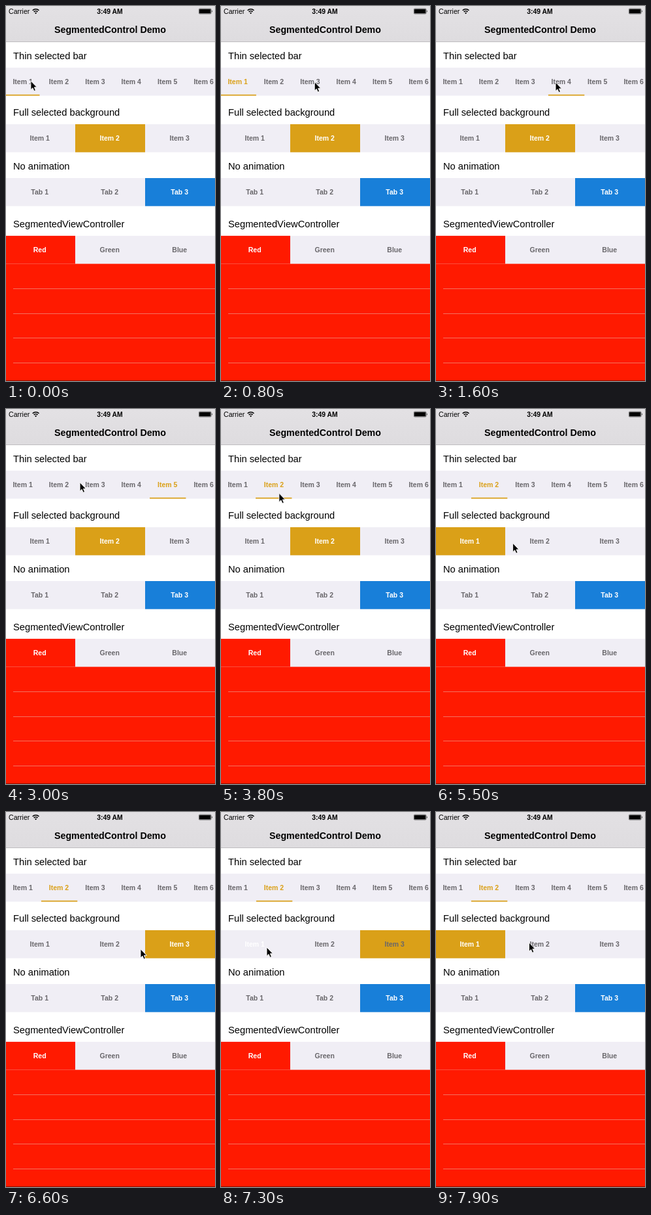
These frames come from a looping animation (320 px wide and 571 px high, 8000 ms). An HTML page:

```html
<!DOCTYPE html>
<html lang="en">
<head>
<meta charset="utf-8">
<title>SegmentedControl Demo</title>
<style>
html, body { margin: 0; width: 100%; height: 100%; overflow: hidden; background: #fff; }
svg { display: block; width: 320px; height: 571px; }
text { font-family: "Liberation Sans", Arial, sans-serif; }
.head { font-size: 14.7px; }
.seg { font-size: 10.5px; font-weight: bold; text-anchor: middle; fill: #69676b; }
</style>
</head>
<body>
<svg viewBox="0 0 320 571">
  <defs>
    <linearGradient id="nav" x2="0" y2="1">
      <stop stop-color="#e3e1e4"/><stop offset="1" stop-color="#dedcdf"/>
    </linearGradient>
  </defs>
  <rect width="320" height="571" fill="#fff"/>
  <rect width="320" height="54" fill="url(#nav)"/>
  <rect y="54" width="320" height="1" fill="#c0bec1"/>
  <text x="4" y="11.5" font-size="10.6">Carrier</text>
  <g fill="none" stroke="#000" stroke-width="1.6">
    <path d="M40.7 6.7a7 7 0 0 1 9.8 0M42.7 8.9a4.2 4.2 0 0 1 5.8 0"/>
    <path d="M45.6 12.2l-1.5-1.7a2.2 2.2 0 0 1 3 0z" fill="#000" stroke="none"/>
  </g>
  <text x="159" y="11.5" font-size="10.4" font-weight="bold" text-anchor="middle">3:49 AM</text>
  <rect x="295.3" y="4" width="18.8" height="8" rx="1.5" fill="none" stroke="#000" stroke-width=".5"/>
  <rect x="296" y="4.7" width="17.4" height="6.6" rx=".8"/>
  <path d="M315 6.3q1.6 1.7 0 3.4z"/>
  <text x="159.5" y="40.7" font-size="14.25" font-weight="bold" text-anchor="middle">SegmentedControl Demo</text>
  <g id="page"></g>
  <path id="cursor" d="M0 0V13.4L3 10.6 5.1 15.4 7.4 14.4 5.4 9.7H9.4Z" stroke="#fff" stroke-width=".9"/>
</svg>
<script>
const LOOP = 8000, ROW = 42.67, GOLD = '#daa018', RED = '#ff1a00';
const page = document.getElementById('page');
const cursor = document.getElementById('cursor');

function add(tag, attrs, text = '') {
  const el = document.createElementNS('http://www.w3.org/2000/svg', tag);
  for (const k in attrs) el.setAttribute(k, attrs[k]);
  el.textContent = text;
  page.append(el);
  return el;
}

const clamp = k => Math.min(1, Math.max(0, k));
const smooth = k => k * k * (3 - 2 * k);
const slide = ms => smooth(clamp(ms / 300));

// Damped spring, about 4.5% overshoot after 350 ms
function spring(ms) {
  const s = 9 * ms / 1000;
  return 1 - Math.exp(-s) * (Math.cos(s) + Math.sin(s));
}

// A heading, its strip, the selection marker and the labels
function control(title, y, names, color, selected, thin = false) {
  const pitch = thin ? 55.4 : 107, left = thin ? -1.5 : -1;
  const height = thin ? 1.7 : ROW;
  add('text', { class: 'head', x: 11, y: y - 12.9 }, title);
  add('rect', { y, width: 320, height: ROW, fill: '#f0eef5' });
  const marker = add('rect', { y: y + ROW - height, height, width: pitch, fill: color });
  const labels = names.map((name, i) =>
    add('text', { class: 'seg', x: left + pitch * (i + .5) - (thin ? .6 : .8), y: y + 25.3 }, name));

  function show(pos, active) {
    marker.setAttribute('x', left + pitch * pos);
    labels.forEach((label, i) =>
      label.style.fill = i === active ? (thin ? color : '#fff') : '');
  }
  // The thin bar springs and colours its label once settled
  function update(t, taps) {
    let from = selected, to = selected, start = -LOOP;
    for (const tap of taps)
      if (tap.time <= t) [from, to, start] = [to, tap.segment, tap.time];
    const age = t - start, move = thin ? spring : slide;
    show(from + (to - from) * move(age), thin && age < 400 ? -1 : to);
  }
  show(selected, selected);
  return { update };
}

const numbered = (word, n) => Array.from({ length: n }, (_, i) => `${word} ${i + 1}`);
add('rect', { y: 392, width: 320, height: 179, fill: RED });
const thin = control('Thin selected bar', 93.87, numbered('Item', 6), GOLD, 1, true);
const full = control('Full selected background', 180, numbered('Item', 3), GOLD, 1);
control('No animation', 262, numbered('Tab', 3), '#187fd9', 2);
control('SegmentedViewController', 349.9, ['Red', 'Green', 'Blue'], RED, 0);
for (let i = 0; i < 4; i++)
  add('rect', { x: 11, y: 430 + Math.round(37.6 * i), width: 309, height: 1, fill: '#f4705f' });
add('rect', { y: 570, width: 320, height: 1, fill: '#8a1000' });

// Where and when the pointer taps
const tap = (time, bar, segment, x, y) => ({ time, bar, segment, x, y });
const taps = [
  tap(-350, thin, 0, 30, 114), tap(1250, thin, 3, 170, 116),
  tap(2200, thin, 4, 242, 117), tap(3250, thin, 1, 94, 111),
  tap(4900, full, 0, 67, 202), tap(6290, full, 2, 222, 209),
  tap(7300, full, 0, 70, 206), tap(8400, full, 1, 212, 192)
];

// The pointer rests around each tap and eases across in between
function movePointer(t) {
  const i = taps.findIndex(p => p.time > t), a = taps[i - 1], b = taps[i];
  const leave = a.time + 150, arrive = b.time - 60;
  const k = smooth(clamp((t - leave) / (arrive - leave)));
  cursor.setAttribute('transform',
    `translate(${a.x + (b.x - a.x) * k} ${a.y + (b.y - a.y) * k})`);
}

function draw(t) {
  for (const bar of [thin, full]) bar.update(t, taps.filter(p => p.bar === bar));
  movePointer(t);
}

const begin = performance.now();
function frame() {
  draw((performance.now() - begin) % LOOP);
  requestAnimationFrame(frame);
}
frame();
</script>
</body>
</html>
```
